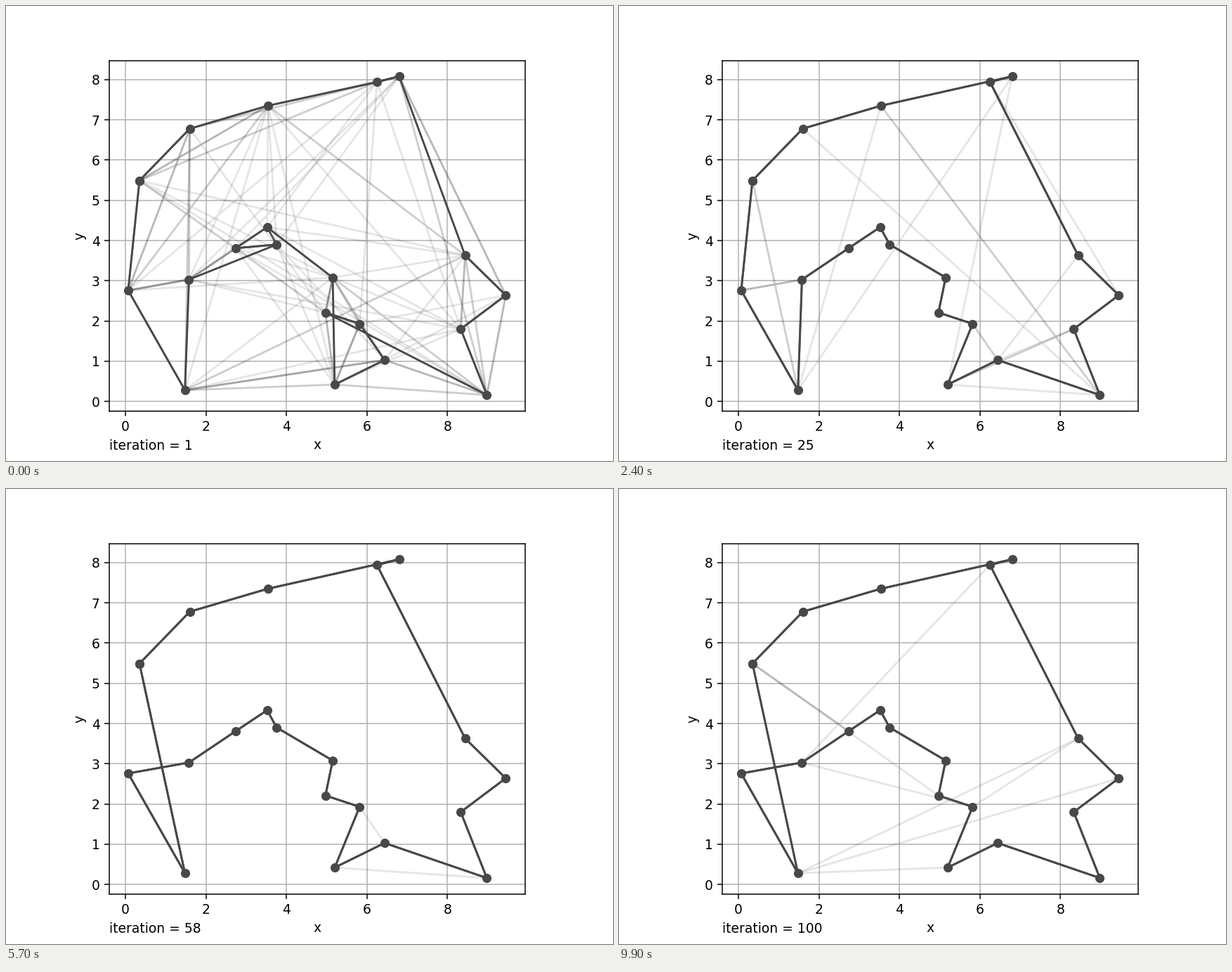
Recreate the animation shown at these times as a matplotlib script. Size 864 by 648 pixels, loop 10 s.

```python
import matplotlib.pyplot as plt
import numpy as np
from matplotlib.animation import FuncAnimation
from matplotlib.collections import LineCollection

FRAMES, INTERVAL = 100, 100
ANTS = 10
DARK = "#484848"

# Cities in the order of the tour the colony settles on
CITIES = np.array([
    (0.35, 5.49), (1.60, 6.78), (3.54, 7.35), (6.80, 8.08), (6.25, 7.94),
    (8.44, 3.63), (9.45, 2.64), (8.33, 1.80), (8.98, 0.16), (6.44, 1.03),
    (5.20, 0.42), (5.82, 1.93), (4.97, 2.21), (5.15, 3.08), (3.76, 3.90),
    (3.52, 4.33), (2.74, 3.81), (1.58, 3.03), (0.07, 2.76), (1.48, 0.28)])
N = len(CITIES)
DIST = np.linalg.norm(CITIES[:, None] - CITIES, axis=2)
NEAR = (DIST + np.eye(N)) ** -2.5


def swapped(tour, *places):
    """Copy of a tour with the cities at each place and the next one exchanged."""
    tour = list(tour)
    for p in places:
        tour[p], tour[p + 1] = tour[p + 1], tour[p]
    return tour


FINAL = list(range(N))
OUTER = swapped(FINAL, 18)
CROSSED = swapped(FINAL, 7, 9)
FIRST = swapped(FINAL, 3, 18)
FIRST[9:13] = 12, 11, 9, 10
FIRST[14:17] = 15, 16, 14


def best_tour(step):
    if step <= 4:
        return FIRST
    if 30 <= step <= 34:
        return CROSSED
    return OUTER if step < 50 else FINAL


def edges_of(tour):
    m = np.zeros((N, N))
    nxt = np.roll(tour, -1)
    m[tour, nxt] = m[nxt, tour] = 1
    return m


RIVALS = sum(edges_of(t) for t in (OUTER, CROSSED, FINAL))


def walk(rng, pull):
    """One ant visits every city once, drawn by scent and nearness."""
    city = rng.integers(N)
    path, free = [city], np.ones(N)
    for _ in range(N - 1):
        free[city] = 0
        odds = pull[city] * free
        city = rng.choice(N, p=odds / odds.sum())
        path.append(city)
    return CITIES[path + path[:1]]


def ant_paths(step):
    rng = np.random.default_rng(step)
    strength = 120 * (1 - np.exp(-(step - 1) / 12))
    scent = 1 + strength * (edges_of(best_tour(step)) + 0.04 * RIVALS)
    return [walk(rng, scent * NEAR) for _ in range(ANTS)]


fig, ax = plt.subplots(figsize=(6.4, 4.8), dpi=135)
ax.set_aspect("equal")
ax.set(xlabel="x", ylabel="y", xlim=(-0.4, 9.925), ylim=(-0.236, 8.472))
ax.grid(True)

trails = LineCollection([], linewidths=1.5, colors=[(0, 0, 0, 0.1)], zorder=2)
ax.add_collection(trails, autolim=False)
best, = ax.plot([], [], "o-", color=DARK, zorder=3)
label = fig.text(147 / 864, 16.5 / 648, "")


def update(frame):
    step = frame + 1
    trails.set_segments(ant_paths(step))
    tour = best_tour(step)
    best.set_data(*CITIES[tour + tour[:1]].T)
    label.set_text(f"iteration = {step}")
    return trails, best, label


anim = FuncAnimation(fig, update, frames=FRAMES, interval=INTERVAL, repeat=True)
plt.show()
```
